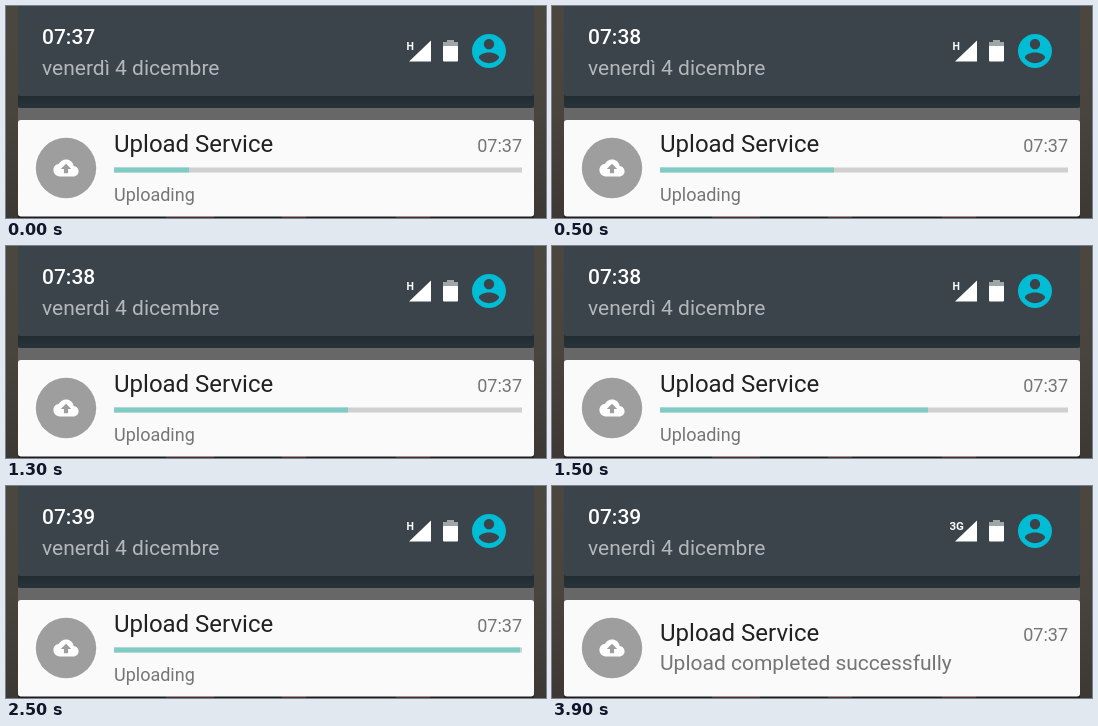
Recreate the animation shown at these times as an HTML page. Size 540x212 px, loop 4.5 s.

```html
<!DOCTYPE html>
<html lang="it">
<head>
<meta charset="utf-8">
<title>Upload notification</title>
<style>
  html, body { margin: 0; width: 100%; height: 100%; overflow: hidden; background: #48433d; }
  svg { display: block; width: 100%; height: 100%; }
  text { font-family: Roboto, "Noto Sans", sans-serif; }
</style>
</head>
<body>
<svg viewBox="0 0 540 212">
  <defs>
    <linearGradient id="wall" x2="0" y2="1">
      <stop offset="0" stop-color="#4b463e"/>
      <stop offset=".5" stop-color="#49443e"/>
      <stop offset="1" stop-color="#3d3833"/>
    </linearGradient>
    <linearGradient id="shade" x2="0" y2="1">
      <stop offset="0" stop-color="#202b31"/>
      <stop offset="1" stop-color="#28343a"/>
    </linearGradient>
  </defs>

  <rect width="540" height="212" fill="url(#wall)"/>
  <rect x="12" y="96" width="516" height="22" fill="#686767"/>
  <rect x="12" y="208" width="516" height="4" fill="#211d1c"/>
  <g fill="#4a3024">
    <rect x="160" y="208" width="48" height="4"/>
    <rect x="276" y="208" width="24" height="4"/>
    <rect x="390" y="208" width="34" height="4"/>
  </g>

  <rect x="12" y="-6" width="516" height="108" rx="2" fill="url(#shade)"/>
  <rect x="12" y="88" width="516" height="14" rx="2" fill="url(#shade)"/>
  <rect x="12" y="-6" width="516" height="96" rx="2" fill="#3a444a"/>

  <text id="clock" x="36" y="38" font-size="21" font-weight="500" fill="#fff"></text>
  <text x="36" y="69" font-size="21" fill="#b3b8bb">venerdì 4 dicembre</text>

  <text id="network" y="44" font-weight="700" fill="#fff"></text>
  <path d="M403 55.5L425 34.5V55.5Z" fill="#fff"/>
  <path d="M441 34h7v2h4v5h-15v-5h4Z" fill="#a0a5a8"/>
  <path d="M437 40h15v14.5q0 1-1 1h-13q-1 0-1-1Z" fill="#fff"/>
  <path transform="translate(462.6 24.6) scale(1.7)" fill="#00bcd4" d="M12 2C6.48 2 2 6.48 2 12s4.48 10 10 10 10-4.48 10-10S17.52 2 12 2zm0 3c1.66 0 3 1.34 3 3s-1.34 3-3 3-3-1.34-3-3 1.34-3 3-3zm0 14.2c-2.5 0-4.71-1.28-6-3.22.03-1.99 4-3.08 6-3.08 1.99 0 5.97 1.09 6 3.08-1.29 1.94-3.5 3.22-6 3.22z"/>

  <rect x="12" y="114" width="516" height="96.5" rx="3" fill="#fafafa"/>
  <circle cx="60" cy="162" r="30.2" fill="#9e9e9e"/>
  <path transform="translate(47.4 149.4) scale(1.05)" fill="#fff" d="M19.35 10.04C18.67 6.59 15.64 4 12 4 9.11 4 6.6 5.64 5.35 8.04 2.34 8.36 0 10.91 0 14c0 3.31 2.69 6 6 6h13c2.76 0 5-2.24 5-5 0-2.64-2.05-4.78-4.65-4.96zM14 13v4h-4v-4H7l5-5 5 5h-3z"/>

  <text id="title" x="108" font-size="24" fill="#212121">Upload Service</text>
  <text id="stamp" x="516" font-size="18" text-anchor="end" fill="#757575">07:37</text>
  <g id="progress">
    <rect x="108" y="161.5" width="408" height="5" fill="#d0d0d0"/>
    <rect id="bar" x="108" y="161.5" height="5" fill="#80cbc4"/>
  </g>
  <text id="status" x="108" fill="#757575"></text>
</svg>
<script>
  const STEP = 500, LOOP = 4500;
  const widths = [75, 174, 234, 268, 345, 406];
  const minutes = [37, 38, 38, 38, 38, 39, 39];
  const el = id => document.getElementById(id);
  const set = (id, attrs, text) => {
    for (const key in attrs) el(id).setAttribute(key, attrs[key]);
    if (text !== undefined) el(id).textContent = text;
  };
  let shown = -1;

  function draw(ms) {
    const step = Math.min(Math.floor((ms % LOOP) / STEP), widths.length);
    if (step === shown) return;
    shown = step;
    const done = step === widths.length;

    set("clock", {}, "07:" + minutes[step]);
    set("network", { x: done ? 397.5 : 400.5, "font-size": done ? 11.5 : 10.5 }, done ? "3G" : "H");
    set("title", { y: done ? 154.5 : 145.5 });
    set("stamp", { y: done ? 154.5 : 145.5 });
    set("progress", { visibility: done ? "hidden" : "visible" });
    set("bar", { width: done ? 408 : widths[step] });
    set("status", { y: done ? 184 : 194.5, "font-size": done ? 21 : 18 },
      done ? "Upload completed successfully" : "Uploading");
  }

  const start = performance.now();
  function tick() {
    draw(performance.now() - start);
    requestAnimationFrame(tick);
  }
  tick();
</script>
</body>
</html>
```
